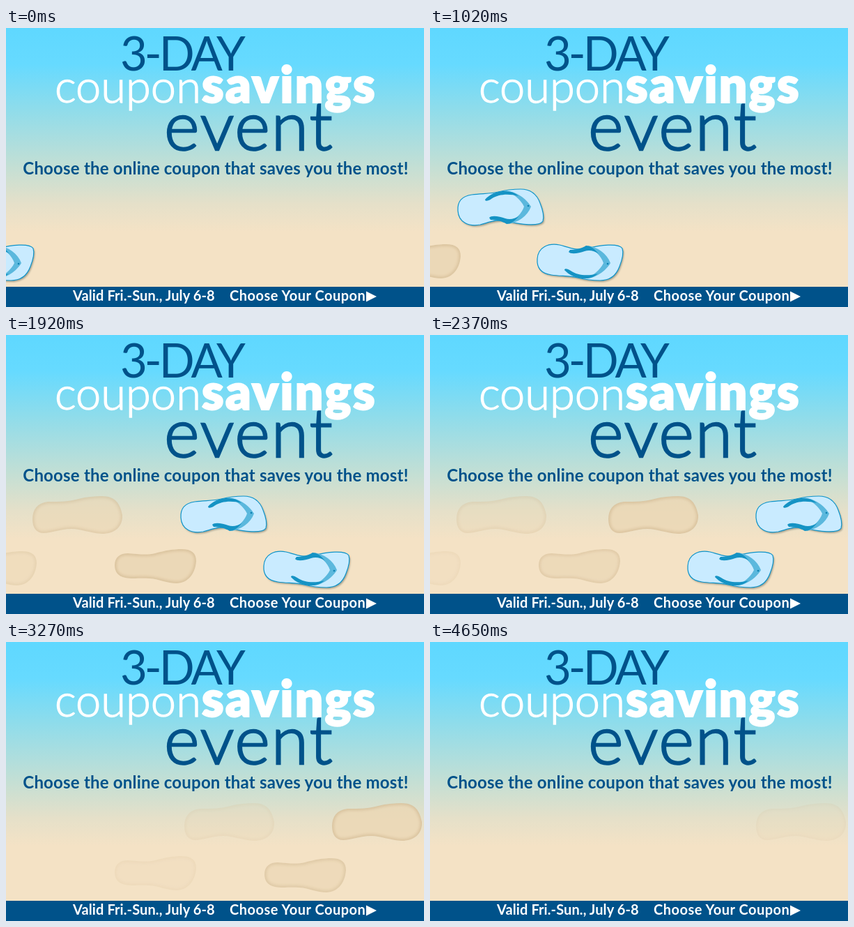
An HTML page without scripts for the animation above (4800 ms loop, 600 by 400 pixels).

```html
<!DOCTYPE html>
<html lang="en">
<head>
<meta charset="utf-8">
<title>Coupon savings event</title>
<style>
html, body { margin: 0; width: 100%; height: 100%; overflow: hidden; }
svg { display: block; width: 600px; height: 400px; }
text { font-family: Lato, "Open Sans", sans-serif; fill: #00528a; }
.white { fill: #fff; }
.footer { font-size: 20px; font-weight: 700; fill: #fff; }
.step { opacity: 0; animation: 4.8s step-end infinite; }

/* Sandals */
#upper { animation-name: upper; }
#lower1 { animation-name: lower1; }
#lower2 { animation-name: lower2; }
#lower3 { animation-name: lower3; }
@keyframes upper {
  0% { opacity: 0; }
  11.042% { opacity: 1; transform: translateX(0); }
  31.25% { opacity: 1; transform: translateX(211px); }
  49.375% { opacity: 1; transform: translateX(428px); }
  68.125%, 100% { opacity: 0; }
}
@keyframes lower1 {
  0% { opacity: 1; }
  19.375% { opacity: .75; }
  20% { opacity: .5; }
  20.625% { opacity: .25; }
  21.25%, 100% { opacity: 0; }
}
@keyframes lower2 {
  0% { opacity: 0; }
  19.375% { opacity: .25; }
  20% { opacity: .5; }
  20.625% { opacity: .75; }
  21.25% { opacity: 1; }
  39.375% { opacity: .5; }
  40%, 100% { opacity: 0; }
}
@keyframes lower3 {
  0% { opacity: 0; }
  39.375% { opacity: .5; }
  40% { opacity: 1; }
  58.125%, 100% { opacity: 0; }
}

/* Footprints wash out a little with every stride */
#print1 { animation-name: print1; }
#print2 { animation-name: print2; }
#print3 { animation-name: print3; }
#print4 { animation-name: print4; }
#print5 { animation-name: print5; }
#print6 { animation-name: print6; }
@keyframes print1 {
  0% { opacity: 0; }
  19.375% { opacity: .25; }
  20% { opacity: .5; }
  20.625% { opacity: .75; }
  21.25% { opacity: 1; }
  31.25% { opacity: .75; }
  40% { opacity: .5; }
  49.375% { opacity: .25; }
  58.125% { opacity: .1; }
  68.125%, 100% { opacity: 0; }
}
@keyframes print2 {
  0% { opacity: 0; }
  31.25% { opacity: 1; }
  40% { opacity: .72; }
  49.375% { opacity: .45; }
  58.125% { opacity: .2; }
  68.125%, 100% { opacity: 0; }
}
@keyframes print3 {
  0% { opacity: 0; }
  39.375% { opacity: .5; }
  40% { opacity: 1; }
  49.375% { opacity: .75; }
  58.125% { opacity: .5; }
  68.125% { opacity: .25; }
  86.875%, 100% { opacity: 0; }
}
@keyframes print4 {
  0% { opacity: 0; }
  49.375% { opacity: 1; }
  58.125% { opacity: .65; }
  68.125% { opacity: .28; }
  86.875% { opacity: .1; }
  96.875%, 100% { opacity: 0; }
}
@keyframes print5 {
  0% { opacity: 0; }
  58.125% { opacity: 1; }
  68.125% { opacity: .8; }
  86.875% { opacity: .3; }
  96.875%, 100% { opacity: 0; }
}
@keyframes print6 {
  0% { opacity: 0; }
  68.125% { opacity: 1; }
  86.875% { opacity: .55; }
  96.875%, 100% { opacity: .2; }
}
</style>
</head>
<body>
<svg viewBox="0 0 600 400">
  <defs>
    <linearGradient id="beach" x1="0" y1="0" x2="0" y2="1">
      <stop offset="0" stop-color="#5fd8ff"/>
      <stop offset=".13" stop-color="#66daff"/>
      <stop offset=".28" stop-color="#8cdcec"/>
      <stop offset=".5" stop-color="#c4dfd4"/>
      <stop offset=".63" stop-color="#e5e0c9"/>
      <stop offset=".73" stop-color="#f4e2c5"/>
      <stop offset="1" stop-color="#f4e2c5"/>
    </linearGradient>
    <filter id="soft" x="-10%" y="-20%" width="120%" height="140%">
      <feGaussianBlur stdDeviation="2.2"/>
    </filter>
    <filter id="shade" x="-10%" y="-20%" width="120%" height="140%">
      <feGaussianBlur stdDeviation="1.2"/>
    </filter>

    <path id="sole" d="M40 262C39 248 46 241 60 239C74 237 86 238 98 235C110 232 120 231 130 231C146 231 154 240 158 251C162 261 164 271 162 277C157 285 130 282 112 277C96 273 84 279 72 282C56 285 41 279 40 262Z"/>
    <g id="top">
      <use href="#sole" fill="#c9ebff" stroke="#0d93c9" stroke-width="1.2"/>
      <path fill="#5bb8dd" d="M108 234C122 233 138 244 145 256C140 270 126 279 112 281C122 275 132 266 135 256C130 246 121 238 108 234Z"/>
      <path fill="#1593c4" d="M79 246C86 238 98 233 112 234C119 235 124 238 127 241C113 237 98 238 88 245C84 248 79 249 79 246ZM85 272C88 268 100 270 108 273C114 275 122 274 128 269C122 277 116 281 110 281C104 277 94 275 87 275Z"/>
      <circle cx="141" cy="255" r="1.3" fill="#0b7fb0"/>
    </g>
    <g id="leftSandal">
      <use href="#sole" x="1.5" y="2" fill="#6f7468" opacity=".6" filter="url(#shade)"/>
      <use href="#top"/>
    </g>
    <g id="rightSandal">
      <use href="#sole" transform="translate(1.5 595) scale(1 -1)" fill="#6f7468" opacity=".6" filter="url(#shade)"/>
      <use href="#top" transform="translate(0 593) scale(1 -1)"/>
    </g>

    <path id="upperShape" d="M38 264C38 250 45 241 60 239C78 239 90 239 104 235C116 232 126 231 138 231C157 231 164 242 167 258C168 275 156 285 138 285C120 284 108 278 94 278C78 278 66 284 54 284C43 284 38 276 38 264Z"/>
    <path id="lowerShape" d="M156 330C156 319 163 313 175 313C190 314 202 316 214 313C228 309 240 307 252 307C267 307 273 313 273 324C272 342 261 356 245 356C230 356 221 350 206 349C191 348 181 350 171 348C161 346 156 340 156 330Z"/>
    <clipPath id="upperClip"><use href="#upperShape"/></clipPath>
    <clipPath id="lowerClip"><use href="#lowerShape"/></clipPath>
    <g id="upperPrint" clip-path="url(#upperClip)">
      <use href="#upperShape" fill="#ecd7b5" opacity=".85"/>
      <use href="#upperShape" fill="none" stroke="#b99b70" stroke-width="4" opacity=".45" filter="url(#soft)"/>
    </g>
    <g id="lowerPrint" clip-path="url(#lowerClip)">
      <use href="#lowerShape" fill="#e8d4b2" opacity=".75"/>
      <use href="#lowerShape" fill="none" stroke="#b99b70" stroke-width="4" opacity=".45" filter="url(#soft)"/>
    </g>
  </defs>

  <rect width="600" height="400" fill="url(#beach)"/>

  <g id="print1" class="step"><use href="#lowerPrint" x="-229" y="3"/></g>
  <g id="print2" class="step"><use href="#upperPrint"/></g>
  <g id="print3" class="step"><use href="#lowerPrint"/></g>
  <g id="print4" class="step"><use href="#upperPrint" x="218"/></g>
  <g id="print5" class="step"><use href="#lowerPrint" x="215" y="3"/></g>
  <g id="print6" class="step"><use href="#upperPrint" x="430"/></g>

  <g id="upper" class="step"><use href="#leftSandal"/></g>
  <g id="lower1" class="step"><use href="#rightSandal" x="-123"/></g>
  <g id="lower2" class="step"><use href="#rightSandal" x="114"/></g>
  <g id="lower3" class="step"><use href="#rightSandal" x="330"/></g>

  <text x="164" y="61" font-size="67" letter-spacing="-4">3-DAY</text>
  <text class="white" x="70" y="107" font-size="65" font-weight="300" stroke="#fff" stroke-width="1.3">coupon</text>
  <text class="white" x="281" y="107" font-size="71" font-weight="900" letter-spacing="2.3" stroke="#fff" stroke-width="2">savings</text>
  <text x="227" y="175" font-size="97" font-weight="300" letter-spacing="2" stroke="#00528a" stroke-width="2.4">event</text>
  <text x="301" y="210" font-size="24" font-weight="700" letter-spacing=".2" text-anchor="middle">Choose the online coupon that saves you the most!</text>

  <rect y="371" width="600" height="29" fill="#00528a"/>
  <text class="footer" x="96" y="391" letter-spacing=".1">Valid Fri.-Sun., July 6-8</text>
  <text class="footer" x="321" y="391" letter-spacing=".5">Choose Your Coupon</text>
  <path class="white" d="M517 377.5L532 385L517 392.5Z"/>
</svg>
</body>
</html>
```
